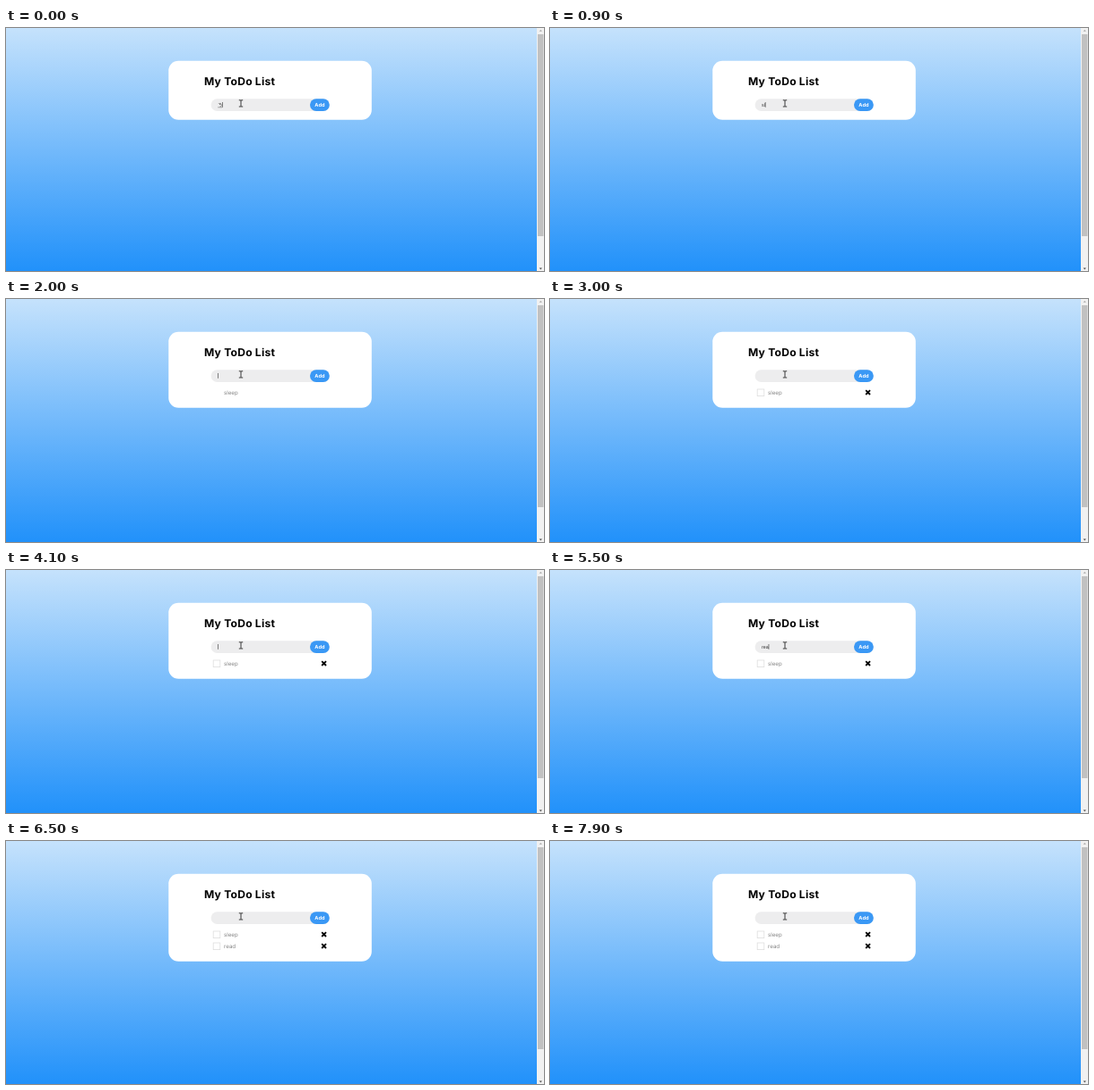
An HTML page for the animation above (8 s loop, 600 by 272 pixels).

```html
<!DOCTYPE html>
<html lang="en">
<head>
<meta charset="utf-8">
<title>My ToDo List</title>
<style>
  html, body { margin: 0; width: 100%; height: 100%; overflow: hidden; }
  svg { display: block; width: 600px; height: 272px; }
  text { font-family: Inter, sans-serif; text-rendering: geometricPrecision; white-space: pre; }
  .title { font-size: 12.1px; font-weight: 700; letter-spacing: .22px; }
  .add { font-size: 5.6px; font-weight: 700; fill: #fff; text-anchor: middle; }
  .item { font-size: 6.2px; fill: #858585; }
  #typed { font: 5.3px "Liberation Sans", "Noto Sans CJK TC", "Noto Sans CJK", sans-serif; fill: #333; }
</style>
</head>
<body>
<svg viewBox="0 0 600 272">
  <defs>
    <linearGradient id="sky" x2="0" y2="1">
      <stop stop-color="#c5e2fc"/>
      <stop offset="1" stop-color="#2191fa"/>
    </linearGradient>
    <g id="icons">
      <rect x="231.2" y="101" width="7.6" height="7.6" fill="#fff" stroke="#dedede" stroke-width=".8"/>
      <path d="M352.2 102.2l4.8 4.8m0-4.8l-4.8 4.8" stroke="#000" stroke-width="1.9"/>
    </g>
  </defs>
  <rect width="600" height="272" fill="url(#sky)"/>

  <rect x="592" width="8" height="272" fill="#f1f1f1"/>
  <rect x="593" y="7" width="6.5" height="226" fill="#c1c1c1"/>
  <path d="M594.7 3.7h3.2l-1.6-1.8z" fill="#a3a3a3"/>
  <path d="M594.7 268.6h3.2l-1.6 1.8z" fill="#505050"/>

  <rect id="card" x="181.3" y="36.7" width="226.5" height="66" rx="11" fill="#fff"/>
  <text class="title" x="221" y="63.6">My ToDo List</text>
  <rect x="228.6" y="79.2" width="132.2" height="13.8" rx="6.9" fill="#ededee"/>
  <rect x="339" y="79.2" width="21.8" height="13.8" rx="6.9" fill="#3a98f5"/>
  <text class="add" x="349.9" y="88.1">Add</text>

  <text id="typed" x="236" y="87.7"></text>
  <path id="underline" d="M236.2 88.8h5" stroke="#555" stroke-width=".5"/>
  <rect id="caret" y="83" width=".6" height="5.8" fill="#333"/>

  <g id="first">
    <text class="item" x="243" y="106.9">sleep</text>
    <use id="firstIcons" href="#icons"/>
  </g>
  <g id="second" transform="translate(0 13)">
    <text class="item" x="243" y="106.9">read</text>
    <use href="#icons"/>
  </g>

  <path d="M259.8 80.8h1.6l.6.4.6-.4h1.6M262 81v6.8M259.8 88h1.6l.6-.4.6.4h1.6"
        fill="none" stroke="#222" stroke-width=".9"/>
</svg>
<script>
const LOOP = 8000;
// [start in ms, text in the field]
const typing = [
  [0, "ㄋ"], [300, ""], [600, "s"], [900, "sl"], [1100, "sle"], [1400, "slee"],
  [1700, "sleep"], [2000, ""], [4700, "r"], [4900, "re"], [5500, "rea"],
  [5600, "read"], [5700, ""]
];
const caretOff = [[2600, 3900], [6000, 7600], [7800, LOOP]];
const el = id => document.getElementById(id);
const show = (id, on) => el(id).setAttribute("visibility", on ? "inherit" : "hidden");

function draw(now) {
  const t = now % LOOP;
  const value = typing.findLast(([start]) => t >= start)[1];
  const typed = el("typed");
  if (typed.textContent !== value) typed.textContent = value;
  const width = value ? typed.getComputedTextLength() : 0;
  el("caret").setAttribute("x", 236 + width);

  show("caret", !caretOff.some(([from, to]) => t >= from && t < to));
  show("underline", t < 300);
  show("first", t >= 2000);
  show("firstIcons", t >= 2100);
  show("second", t >= 5700);
  el("card").setAttribute("height", t < 2000 ? 66 : t < 5700 ? 85 : 98);
  requestAnimationFrame(draw);
}
draw(performance.now());
</script>
</body>
</html>
```
